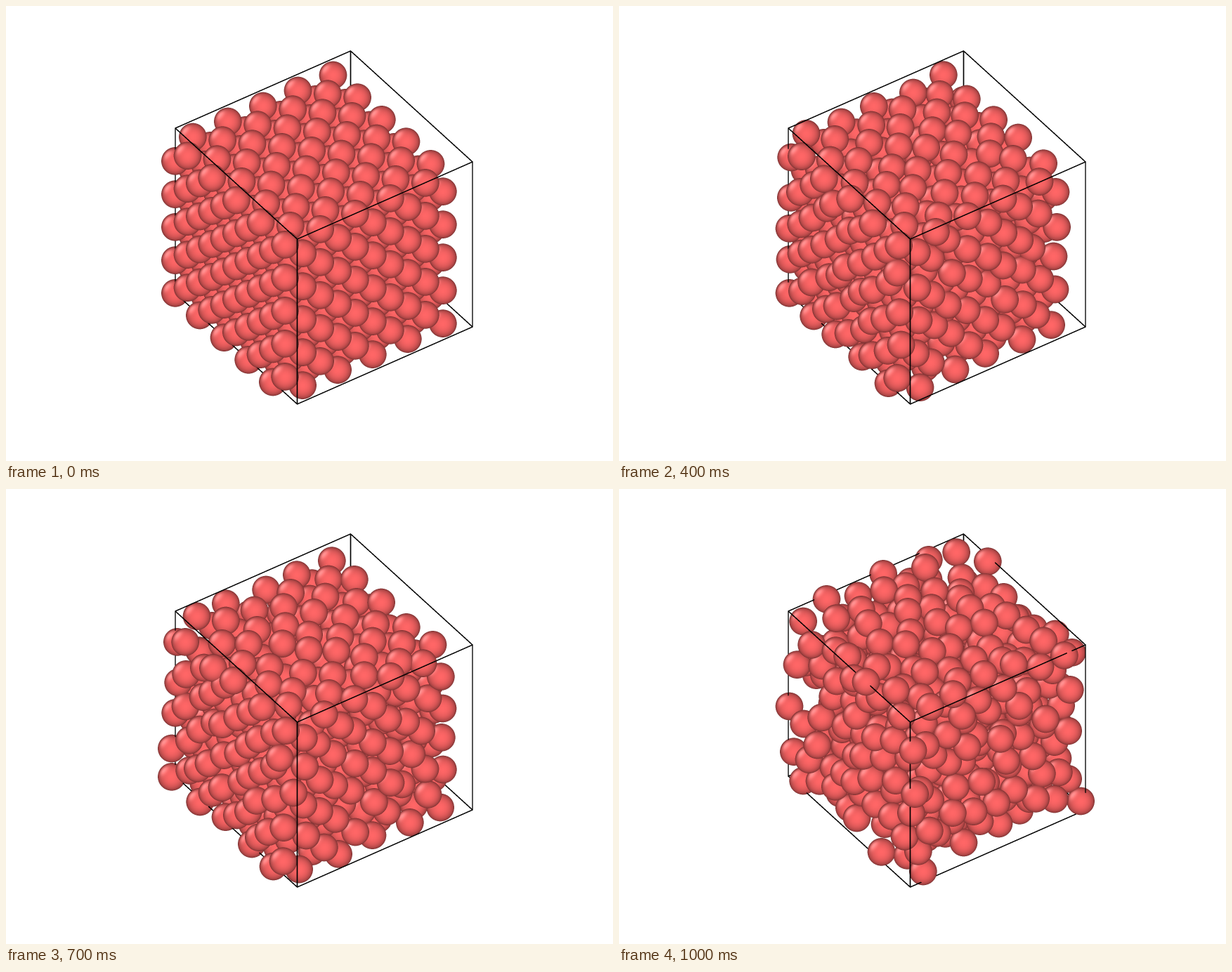
Animation, 864 px wide and 648 px high, one loop 1100 ms. Source, as a matplotlib script:

```python
import itertools
import numpy as np
import matplotlib.pyplot as plt
from matplotlib.animation import FuncAnimation

W, H, SS = 864, 648, 3            # stage size and supersampling
FRAMES, STEP = 11, 100
N, EDGE, RADIUS = 5, 303.85, 19.8  # cells per side, box edge and atom radius in px
LINE = 0.75                       # half width of the box lines
COLOR = np.array([1.0, 0.4, 0.4])

# Box axes on screen: x right, y down, depth toward the viewer.
ORIGIN = np.array([241.0, 409.0, -193.0])
AXES = np.array([[173.5, 158.0, 193.0],
                 [249.5, -110.0, -134.0],
                 [0.0, -235.0, 192.6]])

# Thermal spread of the atoms (px) over the loop; the last two steps melt.
SPREAD = [0, 2.1, 2.4, 2.6, 2.9, 3.1, 3.3, 3.5, 3.8, 10.0, 15.0]
MELT = 9


def project(p):
    return ORIGIN + np.asarray(p, float) @ AXES


def fcc():
    basis = np.array([[0, 0, 0], [.5, .5, 0], [.5, 0, .5], [0, .5, .5]])
    cells = np.array(list(itertools.product(range(N), repeat=3)))
    return (cells[:, None] + basis).reshape(-1, 3) / N


def relax(p, gap, passes=30):
    """Push overlapping atoms apart across the periodic box."""
    for _ in range(passes):
        d = p[:, None] - p[None]
        d -= np.round(d)
        r = np.sqrt((d ** 2).sum(-1)) + 1e-9
        np.fill_diagonal(r, 1)
        push = np.clip(gap - r, 0, None) / r * 0.35
        p = p + (d * push[..., None]).sum(1)
    return p


SITES = fcc()
BIAS = np.random.default_rng(4).normal(size=SITES.shape)


def atoms(i):
    noise = np.random.default_rng(100 + i).normal(size=SITES.shape)
    p = SITES + (0.4 * BIAS + 0.92 * noise) * SPREAD[i] / EDGE
    if i >= MELT:
        p = relax(p, 37.5 / EDGE) % 1.0
    return p


def sphere():
    """Height map and shaded colours of one atom."""
    k = int(np.ceil(RADIUS * SS))
    y, x = np.mgrid[-k:k + 1, -k:k + 1] / (RADIUS * SS)
    r2 = x ** 2 + y ** 2
    nz = np.sqrt(np.clip(1 - r2, 0, 1))
    light = np.array([-1.8, 1.5, -0.2])
    light /= np.linalg.norm(light)
    dot = light[0] * x - light[1] * y + light[2] * nz
    shine = 0.25 * np.clip(2 * dot * nz - light[2], 0, None) ** 6
    rgb = COLOR * (0.4 + 0.6 * nz)[..., None] + shine[..., None]
    height = np.where(r2 <= 1, nz * RADIUS, -np.inf)
    return k, height, np.clip(rgb, 0, 1).astype(np.float32)


K, HEIGHT, SHADE = sphere()


def box_edges():
    for a, b in itertools.combinations(itertools.product((0, 1), repeat=3), 2):
        if sum(m != n for m, n in zip(a, b)) == 1:
            yield project(a), project(b)


def draw_atom(img, depth, c):
    x, y = np.round(c[:2] * SS - 0.5).astype(int)
    area = np.s_[y - K:y + K + 1, x - K:x + K + 1]
    z = HEIGHT + c[2]
    front = z > depth[area]
    depth[area][front] = z[front]
    img[area][front] = SHADE[front]


def draw_edge(img, depth, a, b):
    lo = np.floor((np.minimum(a, b)[:2] - 2) * SS).astype(int)
    hi = np.ceil((np.maximum(a, b)[:2] + 2) * SS).astype(int)
    area = np.s_[lo[1]:hi[1], lo[0]:hi[0]]
    y, x = (np.mgrid[area] + 0.5) / SS
    d = b - a
    t = ((x - a[0]) * d[0] + (y - a[1]) * d[1]) / (d[0] ** 2 + d[1] ** 2)
    t = np.clip(t, 0, 1)
    dist = np.hypot(x - a[0] - t * d[0], y - a[1] - t * d[1])
    front = (dist <= LINE) & (a[2] + t * d[2] > depth[area])
    img[area][front] = 0


def render(i):
    img = np.ones((H * SS, W * SS, 3), np.float32)
    depth = np.full((H * SS, W * SS), -1e9, np.float32)
    for c in project(atoms(i)):
        draw_atom(img, depth, c)
    for a, b in box_edges():
        draw_edge(img, depth, a, b)
    small = img.reshape(H, SS, W, SS, 3).mean((1, 3))
    return np.round(small * 255).astype(np.uint8)


pictures = [render(i) for i in range(FRAMES)]

fig = plt.figure(figsize=(W / 100, H / 100), dpi=100, facecolor="white")
ax = fig.add_axes([0, 0, 1, 1])
ax.axis("off")
view = ax.imshow(pictures[0], aspect="auto", interpolation="nearest")


def update(i):
    view.set_data(pictures[i])
    return (view,)


anim = FuncAnimation(fig, update, frames=FRAMES, interval=STEP,
                     repeat=True, repeat_delay=0, blit=False)
plt.show()
```
